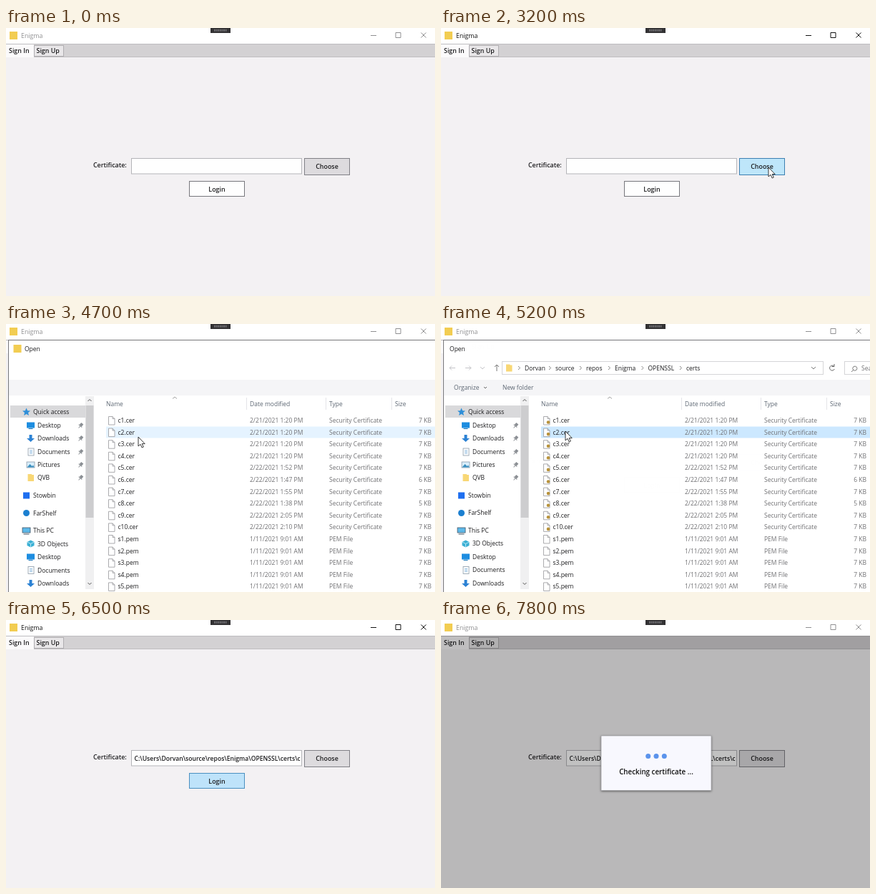
These frames come from a looping animation (600x375 px, 8000 ms). An HTML page:

```html
<!DOCTYPE html>
<html lang="en">
<head>
<meta charset="utf-8">
<title>Enigma sign in</title>
<style>
html, body { margin: 0; width: 100%; height: 100%; overflow: hidden; background: #f3f1f3; }
svg { display: block; width: 600px; height: 375px; }
text { font: 8.5px "Open Sans", "Noto Sans", sans-serif; fill: currentColor; white-space: pre; }
.ui text { font-size: 8.9px; font-weight: 600; fill: #1c1c1e; }
.ui .path { font-size: 8.6px; }
.ui .note { font-size: 9.8px; fill: #111; }
.line { fill: none; stroke: currentColor; }
.head { color: #5c6672; }
.dim { color: #6f6f72; }

.title, .choose, .login, .path, .early, .files, .bars, .hover, .picked, .cursor, .dialog, .shade, .popup, .dot {
  animation: 8s step-end infinite;
}
.title { animation-name: focus; }
.choose { animation-name: choose; }
.login { animation-name: login; }
.path { animation-name: path; }
.early { animation-name: early; }
.files { animation-name: files; }
.bars { animation-name: bars; }
.hover { animation-name: hover; }
.picked { animation-name: picked; }
.cursor { animation-name: seen, move; animation-timing-function: step-end, linear; }
.dialog { animation-name: dialog; animation-timing-function: linear; transform-origin: 340px 212px; }
.shade { animation-name: shade; animation-timing-function: linear; }
.popup { animation-name: popup; animation-timing-function: ease-out; transform-origin: 301px 200px; }
.dot { animation-name: dot; animation-timing-function: ease-in-out; transform-box: fill-box; transform-origin: center; animation-fill-mode: both; }

@keyframes focus {
  0%, 48.75%, 85% { color: #8f8f91; }
  40%, 66.25% { color: #111; }
  100% { color: #8f8f91; }
}
@keyframes choose {
  0%, 66.25%, 100% { fill: #dddbde; stroke: #808086; }
  36.25% { fill: #bee6fa; stroke: #3c7fb1; }
}
@keyframes login {
  0%, 100% { fill: #fefefe; stroke: #77777c; }
  77.5% { fill: #bee3fa; stroke: #4a90c0; }
  83.75% { fill: #c4e5f6; stroke: #2c628b; }
}
@keyframes path { 0%, 100% { visibility: hidden; } 68.75% { visibility: visible; } }
@keyframes early { 0% { visibility: visible; } 60%, 100% { visibility: hidden; } }
@keyframes files { 0%, 100% { visibility: hidden; } 53.75% { visibility: visible; } }
@keyframes bars { 0%, 100% { visibility: hidden; } 60% { visibility: visible; } }
@keyframes hover { 0%, 62.5%, 100% { visibility: hidden; } 57.5% { visibility: visible; } }
@keyframes picked { 0%, 100% { visibility: hidden; } 62.5% { visibility: visible; } }
@keyframes seen { 0%, 81.25%, 100% { visibility: hidden; } 28.75% { visibility: visible; } }
@keyframes move {
  0%, 28.75% { transform: translate(470px, 10px); }
  31.25% { transform: translate(464px, 48px); }
  35% { transform: translate(459px, 150px); }
  38.75%, 41.25% { transform: translate(458px, 195px); }
  45%, 51.25% { transform: translate(481px, 197px); }
  54% { transform: translate(360px, 182px); }
  57.5% { transform: translate(205px, 161px); }
  58.75% { transform: translate(185px, 158px); }
  62.5%, 70% { transform: translate(174px, 150px); }
  77.5%, 100% { transform: translate(290px, 228px); }
}
@keyframes dialog {
  0%, 48.1% { opacity: 0; transform: scale(.965); }
  50% { opacity: .65; transform: scale(.976); }
  52.5%, 65% { opacity: 1; transform: none; }
  66.25% { opacity: .75; transform: scale(.99); }
  67.5% { opacity: .28; transform: scale(.97); }
  68.75%, 100% { opacity: 0; transform: scale(.96); }
}
@keyframes shade { 0%, 83.75% { opacity: 0; } 87.5%, 100% { opacity: .24; } }
@keyframes popup {
  0%, 83.75% { opacity: 0; transform: scale(.4); }
  87.5%, 100% { opacity: 1; transform: none; }
}
@keyframes dot {
  0%, 87.5% { transform: scale(.6); opacity: .5; }
  90%, 92% { transform: none; opacity: 1; }
  93.75% { transform: scale(.7); opacity: .6; }
  95%, 100% { transform: none; opacity: 1; }
}
</style>
</head>
<body>
<svg viewBox="0 0 600 375">
  <defs>
    <filter id="soft" x="-10%" y="-10%" width="120%" height="125%">
      <feDropShadow dx="0" dy="1" stdDeviation="1.8" flood-opacity=".5"/>
    </filter>
    <clipPath id="box"><rect x="177" y="184" width="234.5" height="20"/></clipPath>
  </defs>

  <rect width="600" height="375" fill="#f3f1f3"/>
  <g class="ui">
    <rect y="23" width="600" height="17" fill="#d3d1d3"/>
    <path d="M0 22.5H600M39 40.5H600" stroke="#bfbdc0"/>
    <rect y="23" width="39" height="18" fill="#fbfafb"/>
    <rect x="39.5" y="24.5" width="41" height="15" fill="#e9e7e9" stroke="#b0aeb1"/>
    <text x="4" y="34.5">Sign In</text>
    <text x="42.5" y="35">Sign Up</text>
    <text x="122" y="195">Certificate:</text>
    <rect x="175.5" y="182.5" width="238" height="21.5" fill="#fefefe" stroke="#b4b4b8"/>
    <g clip-path="url(#box)"><text class="path" x="179.5" y="197">C:\Users\Dorvan\source\repos\Enigma\OPENSSL\certs\c2.cer</text></g>
    <rect class="choose" x="417.5" y="182.5" width="63" height="23"/>
    <text x="449" y="197.2" text-anchor="middle">Choose</text>
    <rect class="login" x="256.5" y="214.5" width="77" height="21"/>
    <text x="295" y="228.5" text-anchor="middle">Login</text>
  </g>

  <rect class="shade" y="22" width="600" height="353"/>
  <g class="popup ui">
    <rect x="224" y="162" width="154" height="76.5" fill="#f8f8fe" stroke="#8c8c90" stroke-width=".6" filter="url(#soft)"/>
    <g fill="#5b93ec">
      <circle class="dot" cx="289.7" cy="190.5" r="3.5"/>
      <circle class="dot" cx="301" cy="190.5" r="3.5" style="animation-delay:.1s"/>
      <circle class="dot" cx="312.3" cy="190.5" r="3.5" style="animation-delay:.2s"/>
    </g>
    <text class="note" x="301" y="216" text-anchor="middle">Checking certificate ...</text>
  </g>

  <rect width="600" height="22" fill="#fff"/>
  <rect x="5" y="5" width="11" height="11" fill="#f2cd52"/>
  <g class="title">
    <text x="21" y="14" style="font-size:8.8px">Enigma</text>
    <path class="line" d="M510 10.5h8M545 6.5h7v7h-7zM580.5 6.5l7 7m0-7l-7 7"/>
  </g>

  <g class="dialog" color="#1c1c1e">
    <rect x="3.5" y="22.5" width="680" height="380" fill="#fff" stroke="#77777a"/>
    <g class="early">
      <rect x="10.5" y="29" width="11" height="11" fill="#f2cd52"/>
      <text x="26" y="37.7">Open</text>
    </g>
    <g class="files" id="files"></g>
    <g class="bars" id="bars"></g>
  </g>

  <rect x="286" width="28" height="7" fill="#333234"/>
  <path d="M291 3.2h18" stroke="#6b6a6e" stroke-width="3" stroke-dasharray="2 .6"/>
  <path class="cursor" d="M0 0V13L3 10.3 5.2 15 7.3 14 5.2 9.6H9.2Z" fill="#fff" stroke="#222" stroke-width=".9"/>
</svg>

<script>
const text = (x, y, s, extra = '') => `<text x="${x}" y="${y + 3}" ${extra}>${s}</text>`;
const rect = (x, y, w, h, fill, extra = '') =>
  `<rect x="${x}" y="${y}" width="${w}" height="${h}" fill="${fill}" ${extra}/>`;
const line = (d, color, w = 1) => `<path d="${d}" fill="none" stroke="${color}" stroke-width="${w}"/>`;
const thin = 'stroke="#8a9aa8" stroke-width=".8"';

// Sidebar icons, drawn around their centre
const icons = {
  star: '<path d="M0-5.5 1.6-1.8 5.5-1.5 2.5 1.1 3.5 5 0 2.9-3.5 5-2.5 1.1-5.5-1.5-1.6-1.8Z" fill="#2f8fd8"/>',
  screen: rect(-5.5, -4.5, 11, 8, '#1d8de0') + rect(-3, 4, 6, 1, '#1673b8'),
  down: '<path d="M-2-5H2V0H5.5L0 5-5.5 0H-2Z" fill="#2c82d4"/>',
  page: rect(-3.5, -5, 8, 10, '#fff', thin) + line('M-1.5-2h4M-1.5 0h4M-1.5 2h4', '#6fa8d6', .8),
  photo: rect(-5.5, -4, 11, 8, '#d9eefb', thin) + '<path d="M-5 3.5-1-1 2 2 3.5 .5 5 3.5Z" fill="#3a8fbf"/>',
  folder: '<path d="M-4-5H1L2-4H4.5V5H-4Z" fill="#f8d775"/>',
  square: rect(-4.5, -4.5, 9, 9, '#1f6ff0'),
  round: '<circle r="4.5" fill="#1b7fd0"/>',
  pc: rect(-5.5, -4, 11, 7, '#5db9ea', 'stroke="#456" stroke-width=".8"') + line('M-4 5H4', '#456'),
  cube: '<path d="M0-5 5-2.5V2.5L0 5-5 2.5V-2.5Z" fill="#3bb0d4"/>' + line('M-5-2.5 0 0 5-2.5M0 0V5', '#d8f3fb', .8)
};
const places = [
  ['Quick access', 123, 'star'], ['Desktop', 142, 'screen', 1, 1], ['Downloads', 160, 'down', 1, 1],
  ['Documents', 179, 'page', 1, 1], ['Pictures', 197, 'photo', 1, 1], ['QVB', 215, 'folder', 1, 1],
  ['Stowbin', 240, 'square'], ['FarShelf', 264.5, 'round'], ['This PC', 289, 'pc'],
  ['3D Objects', 307.5, 'cube', 1], ['Desktop', 326, 'screen', 1],
  ['Documents', 344.5, 'page', 1], ['Downloads', 363, 'down', 1]
];
const pin = y => `<g transform="translate(104.5 ${y}) rotate(40)">` +
  rect(-2, -3.5, 4, 4, '#8b8f94') + line('M-3 .8H3M0 1V4.5', '#8b8f94') + '</g>';

let out = rect(4, 78, 680, 22, '#f5f5f7') + rect(6, 114, 105, 17, '#d9d9db');
for (const [name, y, icon, sub = 0, pinned] of places) {
  out += `<g transform="translate(${28.5 + sub * 6} ${y})">${icons[icon]}</g>`;
  out += text(38 + sub * 6, y, name) + (pinned ? pin(y) : '');
}
out += rect(111, 101, 12, 270, '#f0f0f1') + rect(111.5, 114, 11, 157, '#cdcdcf');
out += line('M114.5 108l2.5-2.5 2.5 2.5M114.5 362l2.5 2.5 2.5-2.5', '#555');

out += line('M336.5 103v17M447.5 103v17M539.5 103v17', '#e4e4e8') + line('M233 104.5l3-2.5 3 2.5', '#888', .8);
[['Name', 140], ['Date modified', 341], ['Type', 452], ['Size', 544]]
  .forEach(([s, x]) => out += text(x, 112, s, 'class="head"'));
out += rect(140, 143.5, 540, 16, '#e5f3ff', 'class="hover"') + rect(140, 143.5, 540, 16, '#cce8ff', 'class="picked"');

const times = ['1:52', '1:47', '1:55', '1:38', '2:05', '2:10'];
let seals = '';
for (let i = 0; i < 15; i++) {
  const y = 135 + i * 16.6, cert = i < 10;
  const date = !cert ? '1/11/2021 9:01 AM' : i < 4 ? '2/21/2021 1:20 PM' : `2/22/2021 ${times[i - 4]} PM`;
  const size = i == 5 ? 6 : i == 7 ? 5 : 7;
  out += `<path d="M143.5 ${y - 5.5}h5.5l3 3v8.5h-8.5zm5.5 0v3h3" fill="#fff" stroke="#96969a" stroke-width=".8"/>`;
  out += text(156.5, y, cert ? `c${i + 1}.cer` : `s${i - 9}.pem`);
  out += '<g class="dim">' + text(341, y, date) + text(452, y, cert ? 'Security Certificate' : 'PEM File') +
    text(595, y, size + ' KB', 'text-anchor="end"') + '</g>';
  if (cert) seals += `<circle cx="150" cy="${y + 2.5}" r="2.3" fill="#b8923a"/>`;
}
document.getElementById('files').innerHTML = out;

const field = 'stroke="#d5d5d8"';
let bars = seals + text(12, 35, 'Open') + rect(85.5, 52.5, 449, 18, '#fff', field) + rect(564.5, 52.5, 110, 18, '#fff', field);
bars += line('M20 61.5h-8l3-3m-3 3l3 3M34 61.5h8l-3-3m3 3l-3 3M55 60l3 3 3-3', '#c4c4c8');
bars += line('M78 66v-9l-3 3m3-3l3 3M518 60l3 3 3-3', '#777');
bars += line('M549.5 59a3.5 3.5 0 1 0 .8 4M550 56v3.5h-3.5', '#666');
bars += line('M577 64l-3 3M576.5 64a3 3 0 1 1 .5 .5', '#777');
bars += `<g transform="translate(95 61.5)">${icons.folder}</g>`;
[['Dorvan', 117], ['source', 160], ['repos', 203], ['Enigma', 243], ['OPENSSL', 289.5], ['certs', 343]]
  .forEach(([s, x]) => bars += text(x, 61.5, s) + line(`M${x - 9} 59l2.5 2.5-2.5 2.5`, '#777', .9));
bars += text(588, 61.5, 'Search certs', 'class="dim"');
bars += '<g class="head">' + text(18, 89, 'Organize') + text(86, 89, 'New folder') + '</g>' + line('M60 88l2 2 2-2', '#666');
document.getElementById('bars').innerHTML = bars;
</script>
</body>
</html>
```
